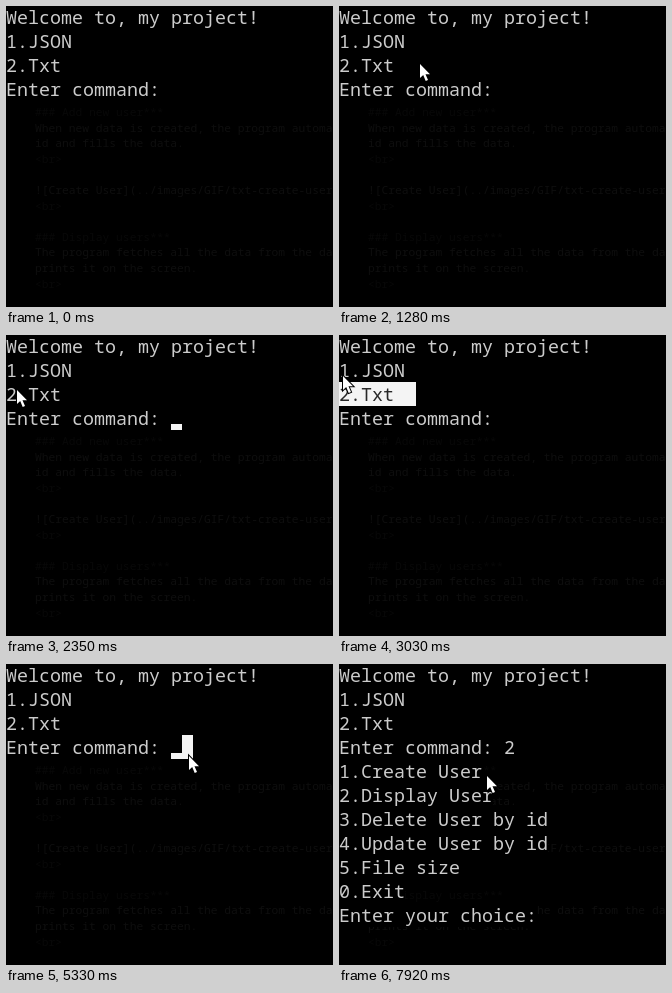
Recreate the animation shown at these times as an HTML page. Size 327 by 301 pixels, loop 8000 ms.

```html
<!DOCTYPE html>
<html lang="en">
<head>
<meta charset="utf-8">
<title>Console menu</title>
<style>
  html, body { margin: 0; width: 100%; height: 100%; overflow: hidden; background: #000; }
  svg { display: block; }
  text { font-family: "Noto Sans Mono", "DejaVu Sans Mono", monospace; white-space: pre; }
  #page text { font-size: 11.28px; fill: #0e0e0e; }
  #page .faint { fill: #080808; }
  .line text { font-size: 18.333px; font-weight: 500; fill: #ccc; }
  #caret, #selection { fill: #f4f4f4; }
  #selection { mix-blend-mode: difference; }
</style>
</head>
<body>
<svg width="327" height="301" viewBox="0 0 327 301">
  <rect width="327" height="301"/>
  <g id="page"></g>
  <g id="prompt"></g>
  <g id="menu"></g>
  <rect id="caret" width="11" height="6"/>
  <rect id="selection" height="24"/>
  <path id="mouse" d="M0 0V14L3.2 11 5.7 17 8 16 5.5 10.3H10Z"
        fill="#fff" stroke="#000" stroke-width="2" paint-order="stroke"/>
</svg>
<script>
const LOOP = 8000, CELL_W = 11, CELL_H = 24, BLINK = 530;
const ENTER = 270, FOCUS = 2085, DRAG = 2830, CLICK = 4410, TYPED = 5790, MENU = 6160;
const $ = id => document.getElementById(id);

function add(parent, tag, attrs, content = "") {
  const node = document.createElementNS("http://www.w3.org/2000/svg", tag);
  for (const key in attrs) node.setAttribute(key, attrs[key]);
  node.textContent = content;
  return parent.appendChild(node);
}

const rowTop = row => row * CELL_H - 1;

// Printed cells are opaque and hide the page behind the console.
function printLine(parent, row, string, col = 0) {
  const line = add(parent, "g", { class: "line" });
  const x = col * CELL_W;
  add(line, "rect", { x, y: rowTop(row), width: string.length * CELL_W, height: CELL_H });
  add(line, "text", { x, y: row * CELL_H + 18 }, string);
  return line;
}

const PAGE = `### Add new user***
When new data is created, the program automatically
id and fills the data.
<br>

![Create User](../images/GIF/txt-create-user.gif)
<br>

### Display users***
The program fetches all the data from the database
prints it on the screen.
<br>`;

PAGE.split("\n").forEach((string, i) => add($("page"), "text", {
  x: 29, y: 110 + i * 15.6, class: /^[#<]/.test(string) ? "faint" : ""
}, string));

["Welcome to, my project!", "1.JSON", "2.Txt", "Enter command: "]
  .forEach((string, i) => printLine($("prompt"), i, string));
const answer = printLine($("prompt"), 3, "2", 15);

["1.Create User", "2.Display User", "3.Delete User by id", "4.Update User by id",
 "5.File size", "0.Exit", "Enter your choice:"]
  .forEach((string, i) => printLine($("menu"), i + 4, string));

const glide = (from, to, x, y) => ({ from, to, x, y });
const GLIDES = [
  glide(ENTER, 950, 99, 58),
  glide(1080, 1280, 81, 58),
  glide(1540, 2220, 11, 55),
  glide(2350, 2630, 71, 61),
  glide(DRAG, 3030, 4, 41),
  glide(3180, 3320, 8, 63),
  glide(3650, 3930, 179, 92),
  glide(4060, 4260, 183, 92),
  glide(6890, 7170, 150, 118),
  glide(7370, 7920, 148, 112)
];

const ease = k => (1 - Math.cos(Math.PI * k)) / 2;

function pointerAt(t) {
  let x = 271, y = 222;
  for (const g of GLIDES) {
    const k = ease(Math.min(1, Math.max(0, (t - g.from) / (g.to - g.from))));
    x += (g.x - x) * k;
    y += (g.y - y) * k;
  }
  return [Math.round(x), Math.round(y)];
}

// Returns the selected cells as { col, end, row }, or null.
function selectionAt(t, mouseX) {
  if (t < DRAG || t >= TYPED) return null;
  if (t >= CLICK) return { col: 16, end: 17, row: 3 };
  return { col: t < 3030 ? Math.floor(mouseX / CELL_W) : 0, end: 7, row: 2 };
}

// Blinks once focused; printing keeps it lit for a moment.
function caretOn(t) {
  const printed = t >= MENU && t < MENU + BLINK;
  return t >= FOCUS && (printed || Math.floor((t - FOCUS) / BLINK) % 2 === 0);
}

const show = (node, on) => node.setAttribute("visibility", on ? "visible" : "hidden");
const place = (node, x, y) => { node.setAttribute("x", x); node.setAttribute("y", y); };

function render(t) {
  const [mx, my] = pointerAt(t);
  show($("mouse"), t >= ENTER);
  $("mouse").setAttribute("transform", `translate(${mx} ${my})`);

  show(answer, t >= TYPED);
  show($("menu"), t >= MENU);

  const [col, row] = t < MENU ? [15, 3] : [18, 10];
  show($("caret"), caretOn(t));
  place($("caret"), col * CELL_W, rowTop(row) + 18);

  const cells = selectionAt(t, mx);
  show($("selection"), cells);
  if (cells) {
    place($("selection"), cells.col * CELL_W, rowTop(cells.row));
    $("selection").setAttribute("width", (cells.end - cells.col) * CELL_W);
  }
}

const start = performance.now();
function tick() {
  render((performance.now() - start) % LOOP);
  requestAnimationFrame(tick);
}
tick();
</script>
</body>
</html>
```
